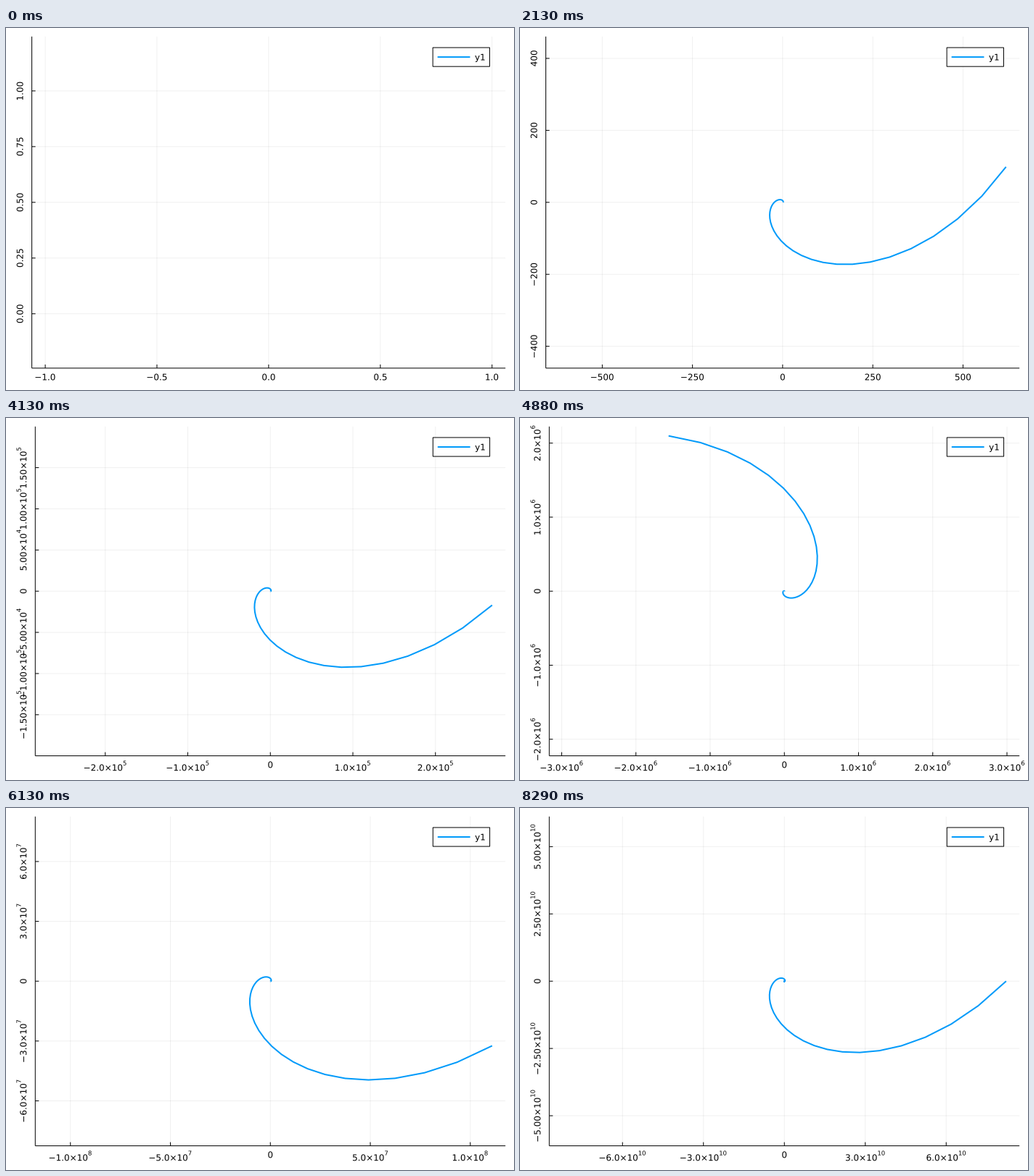
Recreate the animation shown at these times as a matplotlib script. Size 700 by 500 pixels, loop 8.33 s.

```python
import numpy as np
import matplotlib.pyplot as plt
from functools import lru_cache
from matplotlib.animation import FuncAnimation
from matplotlib.collections import LineCollection
from matplotlib.patches import PathPatch, Rectangle
from matplotlib.path import Path
from matplotlib.textpath import TextPath
from matplotlib.transforms import Affine2D

plt.rcParams["font.family"] = "DejaVu Sans"
plt.rcParams["path.simplify"] = False

W, H, DPI = 700, 500, 100
PX = 72 / DPI                      # points per pixel
FRAMES, LOOP_MS = 200, 8330
TOP, RIGHT = 11.8, 688.2
EM = 12

t = np.linspace(0, 8 * np.pi, FRAMES)
xs, ys = np.exp(t) * np.cos(t), np.exp(t) * np.sin(t)


def find_ticks(lo, hi):
    """Evenly spaced ticks scored by count, coverage and niceness."""
    span = hi - lo
    z0 = int(np.floor(np.log10(span)))
    best, ticks = -np.inf, None
    for z in range(z0 - 2, z0 + 2):
        for q, nice in ((1, 1), (5, .9), (2, .7), (2.5, .5), (3, .2)):
            step = q * 10.0 ** z
            first, last = int(np.ceil(lo / step)), int(np.floor(hi / step))
            n = last - first + 1
            if not 4 <= n <= 8:
                continue
            score = (1 - abs(n - 5) / 5) / 4 + nice / 4
            score += 1.5 * span / ((n - 1) * step) / 3
            if score > best:
                best, ticks = score, [i * step for i in range(first, last + 1)]
    return ticks


def decimals(vals):
    return next(p for p in range(8)
                if all(abs(round(v, p) - v) < 1e-6 for v in vals))


def is_sci(ticks):
    return np.log10(ticks[-1] - ticks[0]) > 4 + 1e-9


def tick_labels(ticks):
    if is_sci(ticks):
        p = decimals([float(f"{v:.6e}".split("e")[0]) for v in ticks]) + 1
        out = []
        for v in ticks:
            mant, exp = f"{v:.{p}e}".split("e")
            out.append(f"{mant}×10^{int(exp)}" if v else "0")
    else:
        p = decimals(ticks)
        out = [f"{v:.{p}f}" for v in ticks]
    return [s.replace("-", "\u2212") for s in out]


@lru_cache(maxsize=None)
def label_path(text):
    """Outline centred on x = 0 with its baseline at y = 0."""
    base, _, exp = text.partition("^")
    path = TextPath((0, 0), base, size=EM)
    if exp:
        x = path.get_extents().x1 + 0.066 * EM
        path = Path.make_compound_path(
            path, TextPath((x, 7.6), exp, size=0.7 * EM))
    box = path.get_extents()
    return path.transformed(Affine2D().translate(-(box.x0 + box.x1) / 2, 0))


def across(text, x, y):
    return label_path(text).transformed(Affine2D([[1, 0, x], [0, -1, y], [0, 0, 1]]))


def upward(text, x, y):
    return label_path(text).transformed(Affine2D([[0, -1, x], [-1, 0, y], [0, 0, 1]]))


class View:
    """Equal-aspect plot area in pixels and the data window it shows."""

    def __init__(self, k, sci_x=False, sci_y=False):
        self.left = 40.3 if sci_y else 35.6
        self.bottom = 466.6 if sci_x else 469.8
        self.w, self.h = RIGHT - self.left, self.bottom - TOP
        mx = np.abs(xs[:k + 1]).max()
        my = np.abs(ys[:k + 1]).max()
        self.y_mid = 0
        if my == 0:
            self.y_mid = my = 0.5
        self.scale = min(self.w / mx, self.h / my) / 2.12
        hx, hy = self.w / 2 / self.scale, self.h / 2 / self.scale
        self.xt = find_ticks(-hx, hx)
        self.yt = find_ticks(self.y_mid - hy, self.y_mid + hy)

    def x(self, v):
        return self.left + self.w / 2 + np.asarray(v) * self.scale

    def y(self, v):
        return TOP + self.h / 2 - (np.asarray(v) - self.y_mid) * self.scale


fig = plt.figure(figsize=(W / DPI, H / DPI), dpi=DPI, facecolor="white")
ax = fig.add_axes([0, 0, 1, 1])
ax.set_xlim(0, W)
ax.set_ylim(H, 0)
ax.axis("off")

BLUE = "#009AFA"
grid = LineCollection([], colors=[(0, 0, 0, 0.06)], linewidths=PX, zorder=1)
axes_lines = LineCollection([], colors="black", linewidths=PX, zorder=2)
for lines in (grid, axes_lines):
    lines.set_snap(False)
    ax.add_collection(lines, autolim=False)


def add_line(z):
    line, = ax.plot([], [], color=BLUE, lw=2 * PX, zorder=z, snap=False,
                    solid_capstyle="butt", solid_joinstyle="round")
    return line


curve, key = add_line(3), add_line(5)
frame = ax.add_patch(Rectangle((0, 0), 78.3, 26.1, fc="white", ec="black",
                               lw=PX, zorder=4, snap=False))
words = ax.add_patch(PathPatch(Path(np.zeros((1, 2))), fc="black", lw=0,
                               zorder=6, snap=False))


def update(k):
    v = View(k)
    v = View(k, is_sci(v.xt), is_sci(v.yt))
    px, py = v.x(v.xt), v.y(v.yt)
    L, B = v.left, v.bottom

    grid.set_segments([[(x, TOP), (x, B)] for x in px]
                      + [[(L, y), (RIGHT, y)] for y in py])
    axes_lines.set_segments([[(L, TOP), (L, B)], [(L, B), (RIGHT, B)]]
                            + [[(x, B), (x, B - 5)] for x in px]
                            + [[(L, y), (L + 5, y)] for y in py])
    curve.set_data(v.x(xs[:k + 1]), v.y(ys[:k + 1]))

    edge, top = RIGHT - v.w / 30, TOP + v.h / 30
    frame.set_xy((edge - 78.3, top))
    key.set_data([edge - 71.8, edge - 27], [top + 13.05] * 2)

    text = [across("y1", edge - 13.5, top + 17.5)]
    for s, x in zip(tick_labels(v.xt), px):
        text.append(across(s, x, B + (20.6 if "^" in s else 16.6)))
    for s, y in zip(tick_labels(v.yt), py):
        text.append(upward(s, L - 12.1, y))
    words.set_path(Path.make_compound_path(*text))
    return grid, axes_lines, curve, frame, key, words


anim = FuncAnimation(fig, update, frames=FRAMES, interval=LOOP_MS / FRAMES,
                     repeat=True, repeat_delay=0, blit=False)
plt.show()
```
